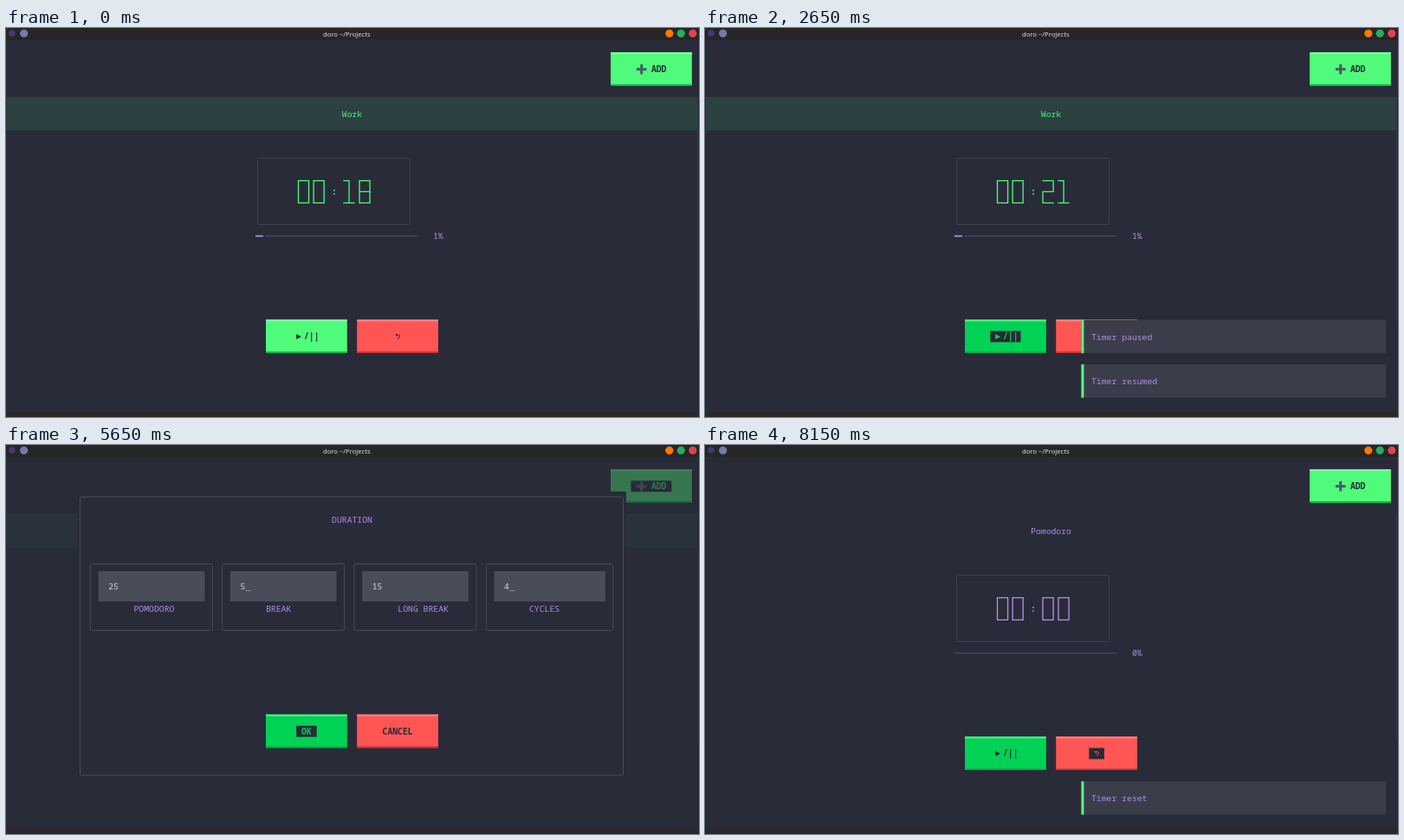
An HTML page for the animation above (8.2 s loop, 800 by 450 pixels).

```html
<!DOCTYPE html>
<html lang="en">
<head>
<meta charset="utf-8">
<title>Timer</title>
<style>
  html, body { margin: 0; width: 100%; height: 100%; overflow: hidden; background: #292c38; }
  svg { display: block; width: 800px; height: 450px; }
  text { font: 9.77px "Noto Sans Mono", "DejaVu Sans Mono", monospace; white-space: pre; }
  .bold { font-weight: 700; }
  .title { font: 7.63px "Noto Sans", sans-serif; }
</style>
</head>
<body>
<svg id="stage" viewBox="0 0 800 450" xmlns="http://www.w3.org/2000/svg"></svg>
<script>
const LOOP = 8200, COL = 5.86, ROW = 12.87;
const BG = '#292c38', INK = '#282a36', PURPLE = '#b08cec', GREEN = '#50fa7b', RED = '#ff5555';
const rowY = n => 15.2 + n * ROW;

// [ms, state from then on]
const steps = [
  [0, { mode: 'work', focus: '', hover: '', dialog: false }],
  [750, { hover: 'play' }],
  [900, { mode: 'paused', focus: 'play' }],
  [2350, { mode: 'work' }],
  [3000, { hover: '' }],
  [3400, { hover: 'add' }],
  [3800, { focus: 'add' }],
  [3850, { dialog: true, hover: 'behind' }],
  [4400, { hover: '' }],
  [5200, { hover: 'ok' }],
  [5500, { dialogFocus: 'ok' }],
  [5700, { dialog: false, hover: '' }],
  [6500, { hover: 'reset' }],
  [6950, { mode: 'idle', focus: 'reset' }],
  [7400, { hover: '' }],
  [7700, { hover: 'play' }]
];

// [from, to, message]
const toasts = [
  [900, 3250, 'Timer paused'],
  [2350, 4700, 'Timer resumed'],
  [5700, 8050, 'Timer limits updated'],
  [6950, LOOP, 'Timer reset']
];

const modes = {
  work: { label: 'Work', text: GREEN, band: '#2d4042', digits: GREEN },
  paused: { label: 'Paused', text: RED, band: '#57353f', digits: '#b9bac2' },
  idle: { label: 'Pomodoro', text: PURPLE, band: 'none', digits: '#b48ff2' }
};

const skins = {
  green: { base: ['#50fa7b', '#86ffa6', '#0cbb4d'], hover: ['#00d255', '#55f283', '#00b146'] },
  red: { base: ['#ff5555', '#ff8585', '#d6303a'], hover: ['#e63c41', '#f7635f', '#c5232f'] }
};

const rect = (x, y, w, h, fill, extra = '') =>
  `<rect x="${x}" y="${y}" width="${w}" height="${h}" fill="${fill}" ${extra}/>`;
const frame = (x, y, w, h, stroke) => rect(x, y, w, h, 'none', `stroke="${stroke}" rx="2"`);
const dot = (x, y, r, fill) => `<circle cx="${x}" cy="${y}" r="${r}" fill="${fill}"/>`;
const text = (x, y, s, fill, anchor = 'start', cls = '') =>
  `<text x="${x}" y="${y + 3.4}" fill="${fill}" text-anchor="${anchor}" class="${cls}">${s}</text>`;
const line = (d, stroke, w) => `<path d="${d}" fill="none" stroke="${stroke}" stroke-width="${w}"/>`;

const labels = {
  play: (cx, cy, ink) => text(cx, cy, '▶/||', ink, 'middle', 'bold'),
  reset: (cx, cy, ink) =>
    line(`M${cx - 1.6} ${cy - 1.7}A2.3 2.3 0 1 0 ${cx - .2} ${cy + 2.2}M${cx - 2.6} ${cy - 2.2}h2v2`
      .replace('0 1 0', '0 1 1'), ink, .9),
  add: (cx, cy, ink, focused) =>
    line(`M${cx - 17} ${cy}h11.6M${cx - 11.2} ${cy - 5.7}v11.4`, focused ? '#6d7079' : '#4b5962', 3) +
    text(cx, cy, 'ADD', ink, 'start', 'bold')
};

function button(id, x, y, skin, focused, hover, cols, label) {
  const [fill, top, bottom] = hover === 'behind' && id === 'add'
    ? ['#49be61', '#49be61', '#3aa653']
    : skins[skin][hover === id ? 'hover' : 'base'];
  const cx = x + 46.9, cy = y + 19.6, w = (cols + 2) * COL;
  const ink = focused ? fill : INK;
  return rect(x, y, 93.8, 38.6, fill) +
    rect(x, y, 93.8, 2, top) + rect(x, y + 36.8, 93.8, 1.8, bottom) +
    (focused ? rect(cx - w / 2, cy - 6.5, w, ROW, INK) : '') +
    (labels[id] ? labels[id](cx, cy, ink, focused) : text(cx, cy, label, ink, 'middle', 'bold'));
}

// Segments: top, upper right, lower right, bottom, lower left, upper left, middle
const segments = ['M0 0H2', 'M2 0V1', 'M2 1V2', 'M0 2H2', 'M0 1V2', 'M0 0V1', 'M0 1H2'];
const shapes = ['012345', '', '01643', '01623', '5612', '05623', '056234', '012', '0123456', '016523'];

function digit(n, x, color) {
  const d = n === 1 ? 'M0 0H1V2M0 2H2' : [...shapes[n]].map(i => segments[i]).join('');
  return `<path transform="translate(${x} 176.6) scale(${COL * 1.03} ${ROW})" d="${d}" fill="none"
    stroke="${color}" stroke-width="1.3" stroke-linecap="square" vector-effect="non-scaling-stroke"/>`;
}

function clock(secs, color) {
  const s = String(Math.floor(secs / 60)).padStart(2, '0') + String(secs % 60).padStart(2, '0');
  return [337.5, 355.1, 390, 408].map((x, i) => digit(+s[i], x, color)).join('') +
    rect(378, 187, 1.6, 1.6, color) + rect(378, 191.2, 1.6, 1.6, color);
}

function progress(secs) {
  const percent = Math.round(secs / 15);
  const bar = percent
    ? rect(288, 239.8, 8.9, 1.7, '#b48ff2') + rect(299.7, 240, 176, 1.3, '#4a4768')
    : rect(288, 240, 187.7, 1.3, '#4a4768');
  return bar + text(493, 241, percent + '%', PURPLE);
}

function toastStack(t) {
  return toasts.filter(([a, b]) => t >= a && t < b).reverse().map(([, , msg], i) => {
    const y = rowY(29 - 4 * i) + .6;
    return rect(434.4, y, 351.6, 38.6, '#3b3e4a') + rect(434.4, y, 3, 38.6, '#5af288') +
      text(446, y + 19.6, msg, PURPLE);
  }).join('');
}

function field(x, w, value, label, labelX) {
  const typed = value.length === 1 ? value + '<tspan fill="#a5a2b0">_</tspan>' : value;
  return frame(x, 137.5, w, 77, '#474a56') +
    rect(x + 9.2, 146, w - 18.2, 35, '#4a4d59') +
    text(x + 20.8, 163.5, typed, '#dccdf0') + text(labelX, 189.4, label, PURPLE);
}

function dialog(s) {
  return rect(0, 14, 800, 430, BG, 'opacity=".63"') +
    rect(82.7, 53.8, 633.2, 334.6, BG) + frame(85.6, 60, 627, 322, '#4a4d59') +
    text(399.5, 86.3, 'DURATION', PURPLE, 'middle') +
    field(97.4, 141, '25', 'POMODORO', 147.5) +
    field(249.6, 141, '5', 'BREAK', 300) +
    field(401.9, 141, '15', 'LONG BREAK', 452.3) +
    field(554.3, 146.5, '4', 'CYCLES', 604) +
    button('ok', 300, 311.7, 'green', s.dialogFocus === 'ok', s.hover, 2, 'OK') +
    button('cancel', 405.2, 311.7, 'red', false, s.hover, 6, 'CANCEL');
}

const chrome = rect(0, 0, 800, 14, '#262626') + rect(0, 444.5, 800, 5.5, '#292828') +
  dot(7, 6, 3.8, '#46386f') + dot(20.7, 6.3, 4.6, '#717ca8') +
  text(393.3, 6.5, 'doro ~/Projects', '#dedede', 'middle', 'title') +
  dot(765.8, 6.3, 4.6, '#ff7800') + dot(779.2, 6.3, 4.6, '#27ae60') + dot(792.8, 6.3, 4.6, '#e0434f') +
  rect(797.8, 80, 1.2, 260, '#323542');

function seconds(t) {
  if (t >= 6950) return 0;
  if (t >= 2350) return 21 + Math.floor((t - 2350) / 500);
  return 18 + (t >= 100) + (t >= 600);
}

function scene(t) {
  const s = Object.assign({}, ...steps.filter(([at]) => t >= at).map(([, change]) => change));
  const mode = modes[s.mode], secs = seconds(t);
  return rect(0, 0, 800, 450, BG) + chrome +
    button('add', 698, 28.2, 'green', s.focus === 'add', s.hover, 6) +
    rect(1, 79.8, 797, 38.6, mode.band) + text(399.5, 99.2, mode.label, mode.text, 'middle') +
    frame(290.5, 150.5, 176, 77, '#3e414d') + clock(secs, mode.digits) + progress(secs) +
    button('play', 300, 337.4, 'green', s.focus === 'play', s.hover, 4) +
    button('reset', 405.2, 337.4, 'red', s.focus === 'reset', s.hover, 1) +
    toastStack(t) + (s.dialog ? dialog(s) : '');
}

const stage = document.getElementById('stage');
const start = performance.now();
let shown = '';

function draw() {
  const next = scene((performance.now() - start) % LOOP);
  if (next !== shown) stage.innerHTML = shown = next;
  requestAnimationFrame(draw);
}
draw();
</script>
</body>
</html>
```
